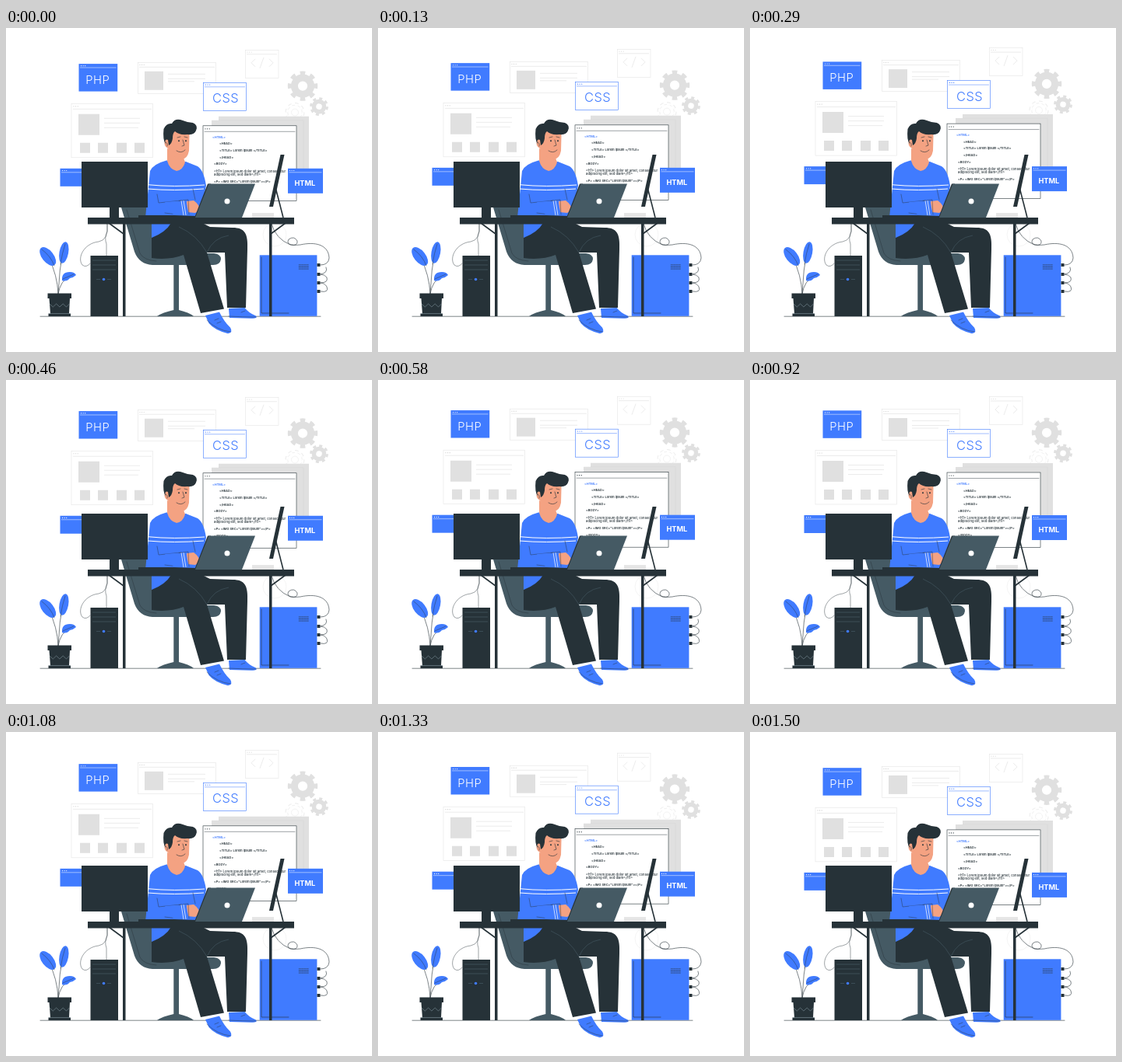
Animation of 470 by 417 pixels, one loop 1.54 s. Source, as an HTML page:

```html
<!DOCTYPE html>
<html lang="en">
<head>
<meta charset="utf-8">
<title>Programmer at a desk</title>
<style>
  @property --p { syntax: "<number>"; inherits: false; initial-value: 0; }
  html, body { margin: 0; width: 100%; height: 100%; overflow: hidden; background: #fff; }
  svg { display: block; width: 470px; height: 417px; }
  text { font-family: Inter, "Open Sans", sans-serif; }
  .float {
    transform: translateY(calc(4.1px * cos(var(--p) * 360deg + 13deg) - 3.2px));
    animation: drift 1540ms steps(37) infinite;
  }
  @keyframes drift { to { --p: 1; } }
  .blue { fill: #407bff; }
  .dark { fill: #263238; }
  .slate { fill: #455a64; }
  .skin { fill: #f4a282; }
  .grey { fill: #e0e0e0; }
  .line { fill: none; stroke: #263238; stroke-width: .6; stroke-linecap: round; stroke-linejoin: round; }
  .fine { stroke-width: .45; }
  .card { fill: #fff; stroke: #e4e4e4; stroke-width: .6; }
  .rule { fill: none; stroke: #e6e6e6; stroke-width: .8; }
  .dots { fill: none; stroke-width: 1.2; stroke-linecap: round; stroke-dasharray: 0 2.6; }
  .white { fill: none; stroke: #fff; }
  .thin { stroke-width: .5; }
  .teeth { fill: none; stroke: #e0e0e0; stroke-dasharray: 1; }
  .title { letter-spacing: .5px; font-weight: 300; }
  .code { font-size: 4px; font-weight: 600; fill: #263238; }
</style>
</head>
<body>
<svg viewBox="0 0 470 417">
  <!-- floating windows -->
  <g class="float">
    <g transform="translate(0 .8)">
      <g opacity=".6">
        <circle class="teeth" cx="371" cy="107" r="10.5" stroke-width="4" pathLength="16"/>
        <circle cx="371" cy="107" r="9.3" fill="#fff" stroke="#e0e0e0" stroke-width=".8"/>
        <circle class="teeth" cx="371" cy="107" r="10" stroke-width="3" pathLength="16" style="stroke:#fff"/>
        <circle class="rule" cx="371" cy="107" r="4.5"/>
      </g>
      <g id="gear">
        <circle cx="381" cy="73" r="10.6" fill="none" stroke="#e0e0e0" stroke-width="9"/>
        <circle class="teeth" cx="381" cy="73" r="16.7" stroke-width="5" pathLength="16" stroke-dashoffset=".5"/>
      </g>
      <use href="#gear" transform="translate(402 99.5) scale(.62) rotate(12) translate(-381 -73)"/>
    </g>

    <rect class="card" x="307.5" y="27.5" width="42.5" height="36"/>
    <path class="rule" d="M309 33H348M320 39L315 44L320 49M331 37L326 51M338 39L343 44L338 49"/>
    <path class="dots" d="M310 30.3h5.4" stroke="#ddd"/>

    <rect class="card" x="169.5" y="43.5" width="100" height="40"/>
    <path class="rule" d="M171 49.5H268M208 58.5H256M208 64.5H256M208 68H242"/>
    <path class="dots" d="M172 46.5h5.4" stroke="#ccc"/>
    <rect class="grey" x="178" y="55" width="24" height="24"/>

    <rect class="card" x="84" y="96.5" width="104.5" height="69.5"/>
    <path class="rule" d="M86 103.5H187M126 115.5H172M126 121.5H172M126 127.5H170"/>
    <path class="dots" d="M87 100h5.4" stroke="#ccc"/>
    <path class="grey" d="M93 110h27v27h-27zM95 147h13v13h-13zM118 147h13v13h-13zM142 147h13v13h-13zM165 147h13v13h-13z"/>

    <rect class="blue" x="93.5" y="45.3" width="49.7" height="35.5"/>
    <path class="dots white" d="M96.5 47.9h5.4"/>
    <path class="white thin" d="M95 50.2H141.5"/>
    <text class="title" x="102.3" y="71.2" font-size="14.8" fill="#fff">PHP</text>

    <rect x="253.5" y="69.5" width="55" height="36" fill="#fff" stroke="#407bff" stroke-width=".6"/>
    <path class="dots" d="M256.5 72.3h5.4" stroke="#407bff"/>
    <path class="thin" d="M255 75H307" stroke="#407bff"/>
    <text class="title" x="265" y="95.6" font-size="16.4" fill="#407bff">CSS</text>

    <rect class="blue" x="69.5" y="180" width="46" height="23"/>
    <path class="dots white" d="M72.5 182.7h5.4"/>
    <path class="white thin" d="M71 185H98"/>

    <path class="grey" d="M273 113H389V211H264V118H273z"/>
    <path d="M273 118H382V210" fill="none" stroke="#d6d6d6" stroke-width=".5"/>
    <rect x="253" y="125" width="120" height="96.5" fill="#fff" stroke="#263238" stroke-width=".6"/>
    <path class="dots" d="M256 129h5.4" stroke="#263238"/>
    <path class="line fine" d="M255 132.5H371"/>
    <g class="code">
      <text x="265" y="141.3" style="fill:#407bff">&lt;HTML&gt;</text>
      <text x="274" y="149.5">&lt;HEAD&gt;</text>
      <text x="274" y="158.3">&lt;TITLE&gt; Lorem ipsum &lt;/TITLE&gt;</text>
      <text x="274" y="167.3">&lt;/HEAD&gt;</text>
      <text x="267" y="175.7">&lt;BODY&gt;</text>
      <g font-weight="500" font-size="4.2">
        <text x="267" y="184.9">&lt;H1&gt; Lorem ipsum dolor sit amet, consectetur</text>
        <text x="267" y="189.4">adipiscing elit, sed diam&lt;/H1&gt;</text>
      </g>
      <text x="267" y="198">&lt;P&gt; &lt;IMG SRC="Lorem ipsum"&gt;&lt;/P&gt;</text>
      <text x="267" y="207">&lt;/BODY&gt;</text>
    </g>

    <rect class="blue" x="362" y="180" width="45" height="32"/>
    <path class="dots white" d="M364.5 182.7h5.4"/>
    <path class="white thin" d="M363.5 185H405.5"/>
    <text x="370.5" y="201.8" font-size="9.2" font-weight="700" fill="#fff">HTML</text>
  </g>

  <rect class="grey" x="316" y="238" width="28" height="6" opacity=".8"/>
  <circle cx="345" cy="266" r="15" fill="none" stroke="#efefef" stroke-width=".7"/>
  <path class="line" d="M44 371.2H404"/>

  <!-- plant -->
  <path class="line" d="M67 342Q66 318 55 296M67 342Q68 312 74 282M67 342Q70 325 82 319"/>
  <ellipse class="blue" cx="53.7" cy="294" rx="7.5" ry="14" transform="rotate(-38 53.7 294)"/>
  <ellipse class="blue" cx="74.3" cy="289" rx="5.8" ry="14" transform="rotate(10 74.3 289)"/>
  <path class="blue" d="M72 325Q71 314 82 314Q88 314 90 318Q87 321 82 322Q78 327 72 325z"/>
  <path class="line fine" d="M46 285Q58 294 62 306M76 278Q72 290 70 304M73 323L87 317"/>
  <path class="dark" d="M53.5 341.500H84V348H82L81 367.500H83V371H54.500V367.500H57L55.500 348H53.500z"/>
  <path d="M56 355l4.300 4 4.300-4 4.300 4 4.300-4 4.300 4 4-4M55 367.500H83" fill="none" stroke="#90a4ae" stroke-width=".5"/>

  <!-- computers and cables -->
  <path class="line fine" d="M130 252Q132 273 119 275C100 277 91 296 98 305Q103 309 108 303M130 252V262Q126 270 129 278V293"/>
  <rect class="dark" x="108.500" y="293" width="35.500" height="78"/>
  <path d="M111 299H141M111 305H141M111 311H141M116 323.500h5M130 323.500h5" stroke="#455a64" stroke-width=".7"/>
  <circle class="blue" cx="125.500" cy="323.500" r="1.800"/>

  <rect class="blue" x="325.700" y="292.300" width="73.700" height="78.500"/>
  <path class="line" d="M328 295V367H363"/>
  <path d="M376 305H389M376 307.500H389M376 310H389" stroke="#263238" stroke-width="1" stroke-dasharray="1.300 .8"/>
  <path class="dark" d="M399.500 303h4v4h-4zM399.500 315h4v4h-4zM399.500 326h4v4h-4zM399.500 337h4v4h-4z"/>
  <path class="line" d="M341 252Q346 271 365 279Q375 281 374 274Q370 267 363 272Q358 281 378 279C396 275 414 278 415 296Q414 305 404 305M404 317Q414 315 411 308M404 328Q414 328 412 321Q409 317 404 317M404 339Q415 341 412 333Q409 328 404 328"/>

  <!-- chair -->
  <path class="slate" d="M148 231H186L199 290H267Q276 291 276 297.500Q275 305 266 305H188Q171 304 165 288z"/>
  <path class="line fine" d="M155 234L172 290Q177 299 193 300"/>
  <path class="slate" d="M215.300 304H222V363Q235 366 241 371H194Q201 366 215.300 363z"/>

  <!-- legs -->
  <path class="dark" d="M187 268V296Q210 299 228 292L250 367L280 361.500L258 289H281L284 360H308L310 285C311 265 307 257 291 257L262 256L250 250H200z"/>
  <path d="M222 256Q245 266 258 289M258 289Q266 270 286 267" fill="none" stroke="#455a64" stroke-width=".6"/>
  <path class="blue" d="M256 370L274 365.500Q280 378 288 385.500Q292 392 285 393.300Q268 389 260.500 380z"/>
  <path class="blue" d="M286 361L306.500 360Q312 367 320 370Q325 373.700 315 373.700L287 373z"/>
  <path class="line fine" d="M258 376Q271 389 288 391M286 371Q304 372 321 372M268 376l5-2M271 380l5-2M302 366l5-2"/>

  <!-- torso and head -->
  <path class="blue" d="M206 170.500Q189 175 185 184L179 244L187 252V270Q205 263 212 251L249 244L257 203Q254 183 246 178L231 172z"/>
  <path class="white" d="M182 201.700Q215 205 255 202M182 207Q215 210 254 207" stroke-width="1"/>
  <path class="line fine" d="M194 214L196 225L225 222M240 207L243 221M204 238L226 241"/>
  <path class="skin" d="M207 155V171Q210 182 219 184Q227 183 230 173L227 164z"/>
  <path class="skin" d="M209 134Q209 126 223 126Q235 127 235.500 139L235 158Q233 169 225 169Q212 167 208 155Q202 152 204 145Q205 141 209 143z"/>
  <path class="dark" d="M209 151L208 144Q203 142 205 150Q201 143 202.500 130Q206 122 213 123Q217 115 227 119Q234 122 240 122Q247 125 244 132Q242 138 233 137Q222 138 217 133Q214 135 214 142Q213 149 209 151z"/>
  <path class="line" d="M220 141l4-1M229 140l4 1M227 144L229 151L226 152M219 158Q225 162 230 157M205 147Q208 148 207 152"/>
  <circle class="dark" cx="222" cy="145.300" r="1"/>
  <circle class="dark" cx="231" cy="145.300" r="1"/>
  <path class="skin" d="M232 223L241 222Q248 227 249 234L243 238L233 237z"/>
  <path class="blue" d="M204 224L231 222L235 240L216 242z"/>
  <path class="white" d="M225 222L228 241M228 222L231 241" stroke-width=".7"/>
  <path class="line fine" d="M222 222.500L234 221L235 240"/>

  <!-- desk and equipment -->
  <path class="dark" d="M170 241H216L245 242V245H170z"/>
  <path class="dark" d="M259 200.500H263L247 244H242z"/>
  <path class="slate" d="M260.500 200.500H320L303 244H243z"/>
  <circle cx="284" cy="223" r="3.500" fill="#fff"/>
  <path class="dark" d="M97 172H182V231H145V245H133V231H97z"/>
  <path class="dark" d="M352.500 163H357.500L343 230H338z"/>
  <path d="M346 205L356 244" stroke="#263238" stroke-width="1.600"/>
  <path class="dark" d="M105 244H370V252.500H105zM150 252H153.500V371H150zM338 252H341.500V371H338z"/>
  <path d="M132 251L151 265M359 251L340 265" stroke="#263238" stroke-width="1.600"/>
</svg>
</body>
</html>
```
